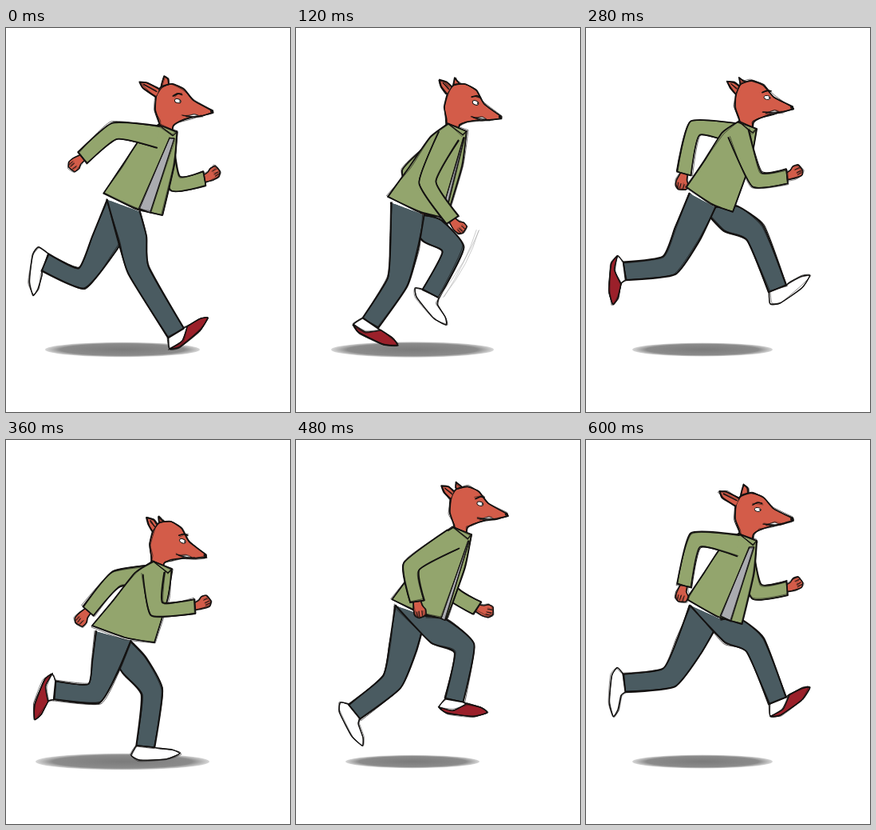
An HTML page with a canvas for the animation above (640 ms loop, 356 by 480 pixels).

```html
<!DOCTYPE html>
<html lang="en">
<head>
<meta charset="utf-8">
<title>Run cycle</title>
<style>
html, body { margin: 0; width: 100%; height: 100%; overflow: hidden; background: #fff; }
canvas { display: block; width: 356px; height: 480px; }
</style>
</head>
<body>
<canvas id="stage"></canvas>
<script>
const W = 356, H = 480, STEPS = 16, STRIDE = 8, STEP_MS = 40;
const RED = '#d35c49', GREEN = '#93a56d', SLATE = '#4a5b61';
const SHOE = '#9b202a', SHIRT = '#aaabb0', INK = '#141211';

// Both legs and both arms share one cycle, half a loop apart.
// Leg: step, knee, ankle, foot angle.
const LEG = [
  [0, 166, 303, 213, 381, -37],
  [1, 183, 315, 175, 383, 0],
  [3, 127, 318, 93, 369, 27],
  [5, 113, 287, 53, 310, 103],
  [7, 104, 297, 48, 304, 97],
  [8, 95, 313, 49, 293, 98],
  [9, 110, 317, 61, 313, 113],
  [11, 197, 277, 169, 332, 52],
  [13, 225, 245, 228, 319, -35],
  [15, 212, 256, 240, 326, -34]
];
// Arm: step, elbow, wrist.
const ARM = [
  [0, 136, 129, 96, 162],
  [1, 138, 174, 103, 214],
  [3, 165, 193, 196, 240],
  [5, 218, 180, 258, 180],
  [8, 212, 194, 249, 188],
  [9, 189, 211, 237, 208],
  [11, 143, 180, 159, 222],
  [13, 147, 136, 145, 181],
  [15, 137, 125, 123, 182]
];
// Body repeats every stride: step, collar, head tilt, hem back, hem front, shadow half width.
const BODY = [
  [0, 203, 125, 1, 122, 207, 184, 234, 97],
  [1, 197, 156, 11, 108, 232, 186, 253, 109],
  [3, 203, 124, 10, 115, 211, 186, 238, 102],
  [5, 215, 102, -6, 126, 188, 187, 210, 66],
  [7, 203, 121, 0, 126, 199, 184, 230, 88]
];

function sample(rows, step, period) {
  const k = step % period;
  const i = rows.findLastIndex(r => r[0] <= k);
  const from = rows[i], to = rows[(i + 1) % rows.length];
  const span = (to[0] - from[0] + period) % period;
  const u = (k - from[0]) / span;
  return from.map((v, j) => v + (to[j] - v) * u).slice(1);
}

const mix = (a, b, u) => [a[0] + (b[0] - a[0]) * u, a[1] + (b[1] - a[1]) * u];
const add = (p, x, y) => [p[0] + x, p[1] + y];
const angle = (a, b) => Math.atan2(b[1] - a[1], b[0] - a[0]);
const pts = text => text.split('  ').map(pair => pair.split(' ').map(Number));

// Moves local points to an origin, turned by a.
function place(list, [ox, oy], a) {
  const c = Math.cos(a), s = Math.sin(a);
  return list.map(([x, y]) => [ox + x * c - y * s, oy + x * s + y * c]);
}

// The two edge points of a limb at p: [back, front].
function edges(p, a, width) {
  return place([[0, width / 2], [0, -width / 2]], p, a);
}

// Direction halfway between two bones.
const bisect = (a, b) => Math.atan2(Math.sin(a) + Math.sin(b), Math.cos(a) + Math.cos(b));

const canvas = document.getElementById('stage');
const ctx = canvas.getContext('2d');
const ratio = window.devicePixelRatio || 1;
canvas.width = W * ratio;
canvas.height = H * ratio;

let seed = 1;
function rand() {
  seed = (seed * 16807) % 2147483647;
  return seed / 2147483647 - 0.5;
}

function trace(p, corners, closed) {
  const n = p.length;
  const slope = i => {
    if (corners.includes(i) || (!closed && (i === 0 || i === n - 1))) return [0, 0];
    const a = p[(i + n - 1) % n], b = p[(i + 1) % n];
    return [(b[0] - a[0]) * 0.09, (b[1] - a[1]) * 0.09];
  };
  ctx.beginPath();
  ctx.moveTo(...p[0]);
  for (let i = 0; i < (closed ? n : n - 1); i++) {
    const j = (i + 1) % n, s = slope(i), e = slope(j);
    ctx.bezierCurveTo(p[i][0] + s[0], p[i][1] + s[1], p[j][0] - e[0], p[j][1] - e[1], ...p[j]);
  }
}

// A firm line with looser, thinner ones over it.
function ink(p, corners = [], closed = false, width = 1.7) {
  ctx.strokeStyle = INK;
  for (const [w, wobble] of [[width, 0.6], [width * 0.6, 2.2], [width * 0.35, 4]]) {
    ctx.lineWidth = w;
    trace(p.map(([x, y]) => [x + rand() * wobble, y + rand() * wobble]), corners, closed);
    ctx.stroke();
  }
}

function shape(p, color, corners = [], closed = true, width = 1.7) {
  trace(p, corners, true);
  ctx.fillStyle = color;
  ctx.fill();
  ink(p, corners, closed, width);
}

function drawShadow(rx) {
  ctx.save();
  ctx.translate(146, 402);
  ctx.scale(rx, 1 + rx * 0.085);
  const g = ctx.createRadialGradient(0, 0, 0, 0, 0, 1);
  g.addColorStop(0, '#7b7b7b');
  g.addColorStop(0.8, '#8b8b8b');
  g.addColorStop(1, '#d8d8d8');
  ctx.fillStyle = g;
  ctx.beginPath();
  ctx.arc(0, 0, 1, 0, 7);
  ctx.fill();
  ctx.restore();
}

// Heel, arch, ball, toe tip, toe top and instep around the ankle.
const FOOT = pts('-18 11  -7 17  26 16  43 9  34 4  16 2');

function drawLeg(step, pose, shod) {
  const [kx, ky, ax, ay, turn] = sample(LEG, step, STEPS);
  const hip = add(mix(pose.hemBack, pose.hemFront, 0.4), 0, 8);
  const knee = [kx, ky], ankle = [ax, ay];
  const thigh = angle(hip, knee), shin = angle(knee, ankle);
  const [midBack, midFront] = edges(mix(hip, knee, 0.5), thigh, 35);
  const [kneeBack, kneeFront] = edges(knee, bisect(thigh, shin), 27);
  const [cuffBack, cuffFront] = edges(ankle, shin, 23);

  const sole = place(FOOT, ankle, turn * Math.PI / 180);
  shape([cuffBack, ...sole, cuffFront], '#fff', [0, 7], false, 1.4);
  if (shod) shape([...sole, mix(sole[1], sole[5], 0.3)], SHOE, [0, 5], true, 1.4);

  const seat = add(mix(pose.hemBack, pose.hemFront, 0.06), 0, 6);
  const lap = add(mix(pose.hemBack, pose.hemFront, 0.62), 0, 6);
  shape([seat, midBack, kneeBack, cuffBack, cuffFront, kneeFront, midFront, lap],
    SLATE, [0, 3, 4, 7], false, 1.9);
}

const FIST = pts('-15 -4  -5 -5  0 -8  7 -7  9 2  5 7  -3 7  -15 4');

function drawArm(step, shoulder) {
  const [ex, ey, wx, wy] = sample(ARM, step, STEPS);
  const elbow = [ex, ey], wrist = [wx, wy];
  const upper = angle(shoulder, elbow), lower = angle(elbow, wrist);

  // The fist curls up as the forearm swings forward.
  const bend = lower - 0.35 * Math.max(0, Math.cos(lower));
  const fist = place([[12, 0]], wrist, bend)[0];
  const at = list => place(list, fist, bend);
  shape(at(FIST), RED, [0, 7], true, 1.4);
  for (const y of [-3, 1, 4]) ink(at([[1, y], [7, y]]), [], false, 0.9);

  const [s1, s2] = edges(shoulder, upper, 27);
  const [e1, e2] = edges(elbow, bisect(upper, lower), 21);
  const [w1, w2] = edges(wrist, lower, 18);
  shape([s1, e1, w1, w2, e2, s2], GREEN, [0, 2, 3, 5], false);
}

const SKULL = pts('195 126  192 112  187 98  188 80  194 69  208 65  223 71  235 85  259 97  260 100  246 104  232 107  217 112  210 117  209 126');

function drawHead({ collar, tilt, turn }) {
  const eye = 227 - 12 * turn;
  const far = [192 + 6 * turn, 61 - 6 * turn], near = [177 - 10 * turn, 66 - 3 * turn];
  ctx.save();
  ctx.translate(collar[0] + 2, collar[1] - 30);
  ctx.rotate(tilt * Math.PI / 180);
  ctx.translate(-205, -90);
  shape([[194, 69], far, add(far, 5, 4), [203, 68]], RED, [1]);
  shape(SKULL, RED, [8, 9], false);
  shape([[191, 71], add(near, 9, 1), near, add(near, 4, 8), [187, 81]], RED, [2], false, 1.9);
  ink([add(near, 5, 3), [189, 75]], [], false, 1.2);

  ctx.fillStyle = '#fff';
  ctx.lineWidth = 1;
  ctx.beginPath();
  ctx.ellipse(eye, 86, 4, 2.5, 0.2, 0, 7);
  ctx.fill();
  ctx.stroke();
  ink([[eye - 6, 80], [eye, 77], [eye + 5, 78]], [], false, 1.6);

  shape(pts('226 105  236 102  242 104  235 106'), '#fff', [0, 2], true, 0.7);
  ink(pts('222 104  236 105  246 104'), [], false, 1.1);
  ctx.fillStyle = INK;
  ctx.fillRect(eye + 2, 85.5, 1.5, 1.5);
  ctx.beginPath();
  ctx.arc(258, 98, 2, 0, 7);
  ctx.fill();
  ctx.restore();
}

function drawJacket({ collar, hemBack, hemFront, turn }) {
  const back = add(collar, -12, -4), front = add(collar, 11, 5);
  shape([
    back,
    add(mix(back, hemBack, 0.25), -4, -6),
    add(mix(back, hemBack, 0.6), -4, 0),
    hemBack,
    add(mix(hemBack, hemFront, 0.55), 0, 4),
    hemFront,
    add(mix(front, hemFront, 0.4), 4, 0),
    front
  ], GREEN, [0, 3, 5, 7]);

  // The open coat shows more shirt as the chest turns to the viewer.
  if (turn > 0) {
    const left = 0.97 - 0.37 * turn, right = left + 0.04 + 0.15 * turn;
    const hem = u => add(mix(hemBack, hemFront, u), 0, 2);
    const top = add(front, -3, 8);
    shape([add(top, -6 * turn, 0), top, hem(right), hem(left)], SHIRT, [0, 1, 2, 3], true, 1.2);
  }
  ink([back, add(front, -5, 5), front], [1], false, 1.2);
}

// Faint arcs behind a swinging leg: start, bend and end points.
const TRAILS = { 3: pts('229 250  214 292  182 335'), 13: pts('216 253  175 284  112 280') };

function drawTrails(step) {
  if (!TRAILS[step]) return;
  ctx.strokeStyle = '#aaa';
  ctx.lineWidth = 0.6;
  for (let i = 0; i < 3; i++) {
    const [a, b, c] = TRAILS[step].map(p => add(p, rand() * 8, rand() * 8));
    ctx.beginPath();
    ctx.moveTo(...a);
    ctx.quadraticCurveTo(...b, ...c);
    ctx.stroke();
  }
}

function bodyPose(step) {
  const [cx, cy, tilt, bx, by, fx, fy, shade] = sample(BODY, step, STRIDE);
  const turn = Math.max(0, Math.cos((step + 0.5) / STEPS * 2 * Math.PI));
  return { collar: [cx, cy], tilt, turn, shade, hemBack: [bx, by], hemFront: [fx + 12 * turn, fy] };
}

function draw(step) {
  seed = 991 + step * 7717;
  ctx.setTransform(ratio, 0, 0, ratio, 0, 0);
  ctx.lineCap = ctx.lineJoin = 'round';
  ctx.fillStyle = '#fff';
  ctx.fillRect(0, 0, W, H);

  const pose = bodyPose(step), other = step + STRIDE;
  drawShadow(pose.shade);
  drawArm(other, add(pose.collar, -7, 13));
  drawLeg(other, pose, false);
  drawLeg(step, pose, true);
  drawTrails(step);
  drawHead(pose);
  drawJacket(pose);
  drawArm(step, add(pose.collar, -12, 11));
}

const start = performance.now();
let shown = -1;
function tick() {
  const step = Math.floor((performance.now() - start) / STEP_MS) % STEPS;
  if (step !== shown) draw(shown = step);
  requestAnimationFrame(tick);
}
tick();
</script>
</body>
</html>
```
